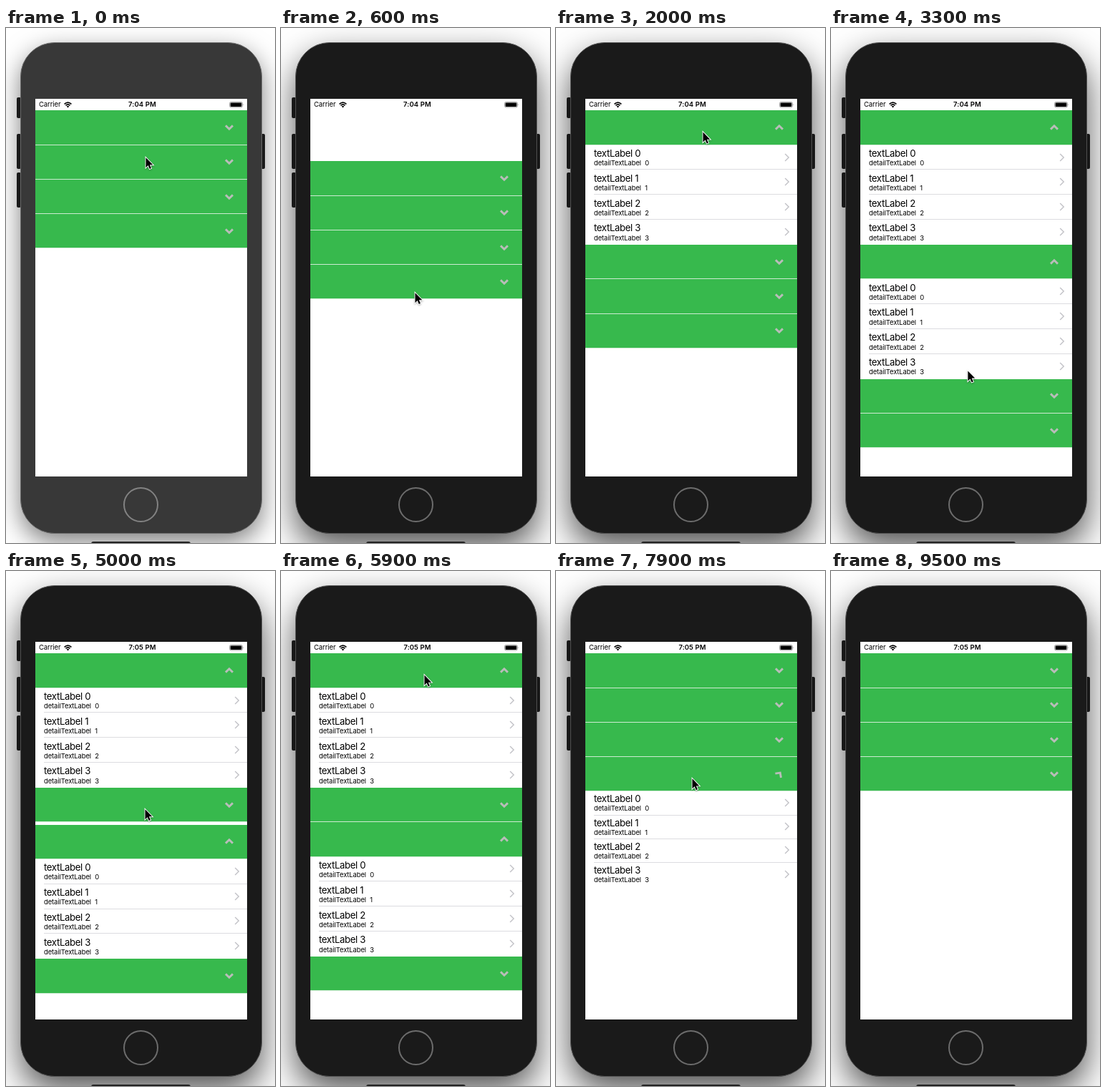
Write an HTML page that moves like this. It is 376 px wide and 720 px high and loops after 9.6 s.

```html
<!DOCTYPE html>
<html lang="en">
<head>
<meta charset="utf-8">
<title>Expandable table</title>
<style>
  html, body { margin: 0; width: 100%; height: 100%; overflow: hidden; background: #fff; }
  body { position: relative; font-family: Inter, Roboto, "Liberation Sans", sans-serif; color: #000; }
  div, span, svg { position: absolute; box-sizing: border-box; }
  svg { overflow: visible; fill: none; }
  span { white-space: pre; }

  .button { width: 6px; height: 49px; background: #222; border-radius: 2px; }
  .phone {
    left: 20px; top: 20px; width: 338px; height: 687px;
    border: 1px solid #505050; border-radius: 48px; background: #1a1a1a;
    box-shadow: 0 20px 48px rgba(0, 0, 0, .68);
  }
  .home {
    left: 164px; top: 642px; width: 49px; height: 49px;
    border: 2px solid #6c6c6c; border-radius: 50%;
  }
  .inactive .phone { background: #383838; border-color: #6a6a6a; box-shadow: 0 12px 34px rgba(0, 0, 0, .5); }
  .inactive .home { border-color: #828282; }
  .dock { left: 119px; top: 718px; width: 139px; height: 6px; border-radius: 3px; background: #222; }

  .screen { left: 41px; top: 99px; width: 296px; height: 528px; overflow: hidden; background: #fff; }
  .status { font-size: 9.5px; line-height: 12px; top: 2.4px; }
  .carrier { left: 5px; letter-spacing: -.1px; }
  .clock { left: 0; width: 299px; text-align: center; font-weight: 600; letter-spacing: .1px; }

  .table { left: 0; width: 296px; }
  .section, .header, .row { position: relative; width: 296px; }
  .header { height: 48.25px; background: #37b94d; border-bottom: 1px solid #cdebd2; }
  .header svg { left: 271px; top: 23.8px; stroke: #b9bdb9; stroke-width: 2.9; }
  .row { overflow: hidden; }
  .cell { width: 296px; bottom: 0; height: 34.85px; }
  .row:not(:last-child) .cell::after {
    content: ""; position: absolute; left: 12px; right: 0; bottom: 0; height: 1px; background: #dcdce0;
  }
  .thin .cell { visibility: hidden; }
  .title { left: 12px; top: 3.3px; font-size: 13.2px; line-height: 16px; letter-spacing: -.36px; }
  .detail { left: 12px; top: 19.6px; font-size: 9.45px; line-height: 12px; letter-spacing: -.1px; }
  .cell svg { left: 278.5px; top: 16.9px; stroke: #c4c4c9; stroke-width: 1.5; }
  .cursor {
    left: 0; top: 0; fill: #000; stroke: #fff; stroke-width: 2.2; paint-order: stroke;
    filter: drop-shadow(0 1px 1px rgba(0, 0, 0, .3));
  }
</style>
</head>
<body>
<div class="button" style="left:15px;top:97px;height:29px"></div>
<div class="button" style="left:15px;top:148px"></div>
<div class="button" style="left:15px;top:202px"></div>
<div class="button" style="left:356px;top:148px"></div>
<div class="phone"></div>
<div class="home"></div>
<div class="dock"></div>

<div class="screen">
  <span class="status carrier">Carrier</span>
  <svg width="12" height="9" style="left:40px;top:4px" stroke="#000" stroke-width="1.7">
    <path d="M.6 3.3Q5.5-1.2 10.4 3.3M2.5 5.3Q5.5 2.6 8.5 5.3"/>
    <path d="M3.7 6.5Q5.5 5 7.3 6.5L5.5 8.4z" fill="#000" stroke="none"/>
  </svg>
  <span class="status clock"></span>
  <svg width="21" height="8" style="left:271px;top:4px">
    <rect x=".5" y=".5" width="18" height="7.4" rx="2" stroke="#888" stroke-width=".8"/>
    <rect x="1.6" y="1.5" width="15.8" height="5.4" rx="1" fill="#000"/>
    <path d="M19.7 2.8q1.2 1.4 0 2.8z" fill="#888"/>
  </svg>
  <div class="table"></div>
</div>

<svg class="cursor" width="14" height="20"><path transform="translate(.5 1.2) scale(.84)"
  d="M0 0V16.6L3.8 13L6.3 18.8L8.9 17.7L6.4 12H11.7z"/></svg>

<script>
const LOOP = 9600, STEP = 100;
const TOP = 16.4, HEADER = 48.25, ROW = 34.85, ROWS = 4, PULL = 71;
const SLIDE = 300, TURN = 200, GLIDE = 450, PAUSE = 200;

// Each tap toggles its section.
const taps = [
  { section: 0, at: 1650, x: 205 }, { section: 1, at: 2650, x: 194 },
  { section: 2, at: 3640, x: 190 }, { section: 1, at: 4730, x: 194 },
  { section: 0, at: 5950, x: 200 }, { section: 2, at: 6650, x: 190 },
  { section: 3, at: 7450, x: 190 }, { section: 3, at: 7860, x: 190 }
];

const clamp = p => Math.min(1, Math.max(0, p));
const ease = p => .5 - .5 * Math.cos(Math.PI * clamp(p));

function sectionState(section, t) {
  const past = taps.filter(tap => tap.section === section && tap.at <= t);
  if (!past.length) return { open: 0, turn: 0 };
  const age = t - past[past.length - 1].at;
  const toggle = p => past.length % 2 ? p : 1 - p;
  return { open: toggle(ease(age / SLIDE)), turn: toggle(clamp(age / TURN)) };
}

function headerTop(section, t) {
  let y = 99 + TOP;
  for (let i = 0; i < section; i++) y += HEADER + ROWS * ROW * sectionState(i, t).open;
  return y;
}

// The cursor settles on a header shortly before tapping it, and leaves at the end.
const glides = taps.map(({ section, at, x }) => ({
  start: at - PAUSE - GLIDE, x, y: headerTop(section, at) + 29
}));
glides.push({ start: 8250, x: 345, y: 80 });

const drag = t => ease((t - 200) / 400);
const release = t => ease((t - 700) / 300);

function cursorAt(t) {
  let x = 195 - 8 * drag(t), y = 180 + 189 * drag(t);
  for (const g of glides) {
    const p = ease((t - g.start) / GLIDE);
    x += (g.x - x) * p;
    y += (g.y - y) * p;
  }
  return [x, y];
}

const $ = s => document.querySelector(s);
const repeat = html => Array.from({ length: ROWS }, (_, i) => html(i)).join("");
const rowHtml = i => `<div class="row"><div class="cell">
  <span class="title">textLabel ${i}</span><span class="detail">detailTextLabel  ${i}</span>
  <svg width="6" height="1"><path d="M.2-5L5.2 0L.2 5"/></svg></div></div>`;
const sectionHtml = () => `<div class="section"><div class="header">
  <svg width="1" height="1"><path d="M-5-2.6L0 2.3L5-2.6"/></svg></div>${repeat(rowHtml)}</div>`;

const table = $(".table"), clock = $(".clock"), cursor = $(".cursor");
table.innerHTML = repeat(sectionHtml);
const sections = [...table.children].map(el => ({
  arrow: el.querySelector(".header path"),
  rows: el.querySelectorAll(".row")
}));

function draw(t) {
  document.body.classList.toggle("inactive", t < 100);
  clock.textContent = t < 3800 ? "7:04 PM" : "7:05 PM";
  table.style.top = TOP + PULL * drag(t) * (1 - release(t)) + "px";
  sections.forEach(({ arrow, rows }, i) => {
    const { open, turn } = sectionState(i, t);
    arrow.setAttribute("transform", `rotate(${-180 * turn})`);
    for (const row of rows) {
      row.style.height = ROW * open + "px";
      row.classList.toggle("thin", open < .06);
    }
  });
  const [x, y] = cursorAt(t);
  cursor.style.transform = `translate(${x}px, ${y}px)`;
  cursor.style.display = t < 8600 ? "" : "none";
}

const began = performance.now();
function tick() {
  const t = (performance.now() - began) % LOOP;
  draw(Math.floor(t / STEP) * STEP);
  requestAnimationFrame(tick);
}
tick();
</script>
</body>
</html>
```
